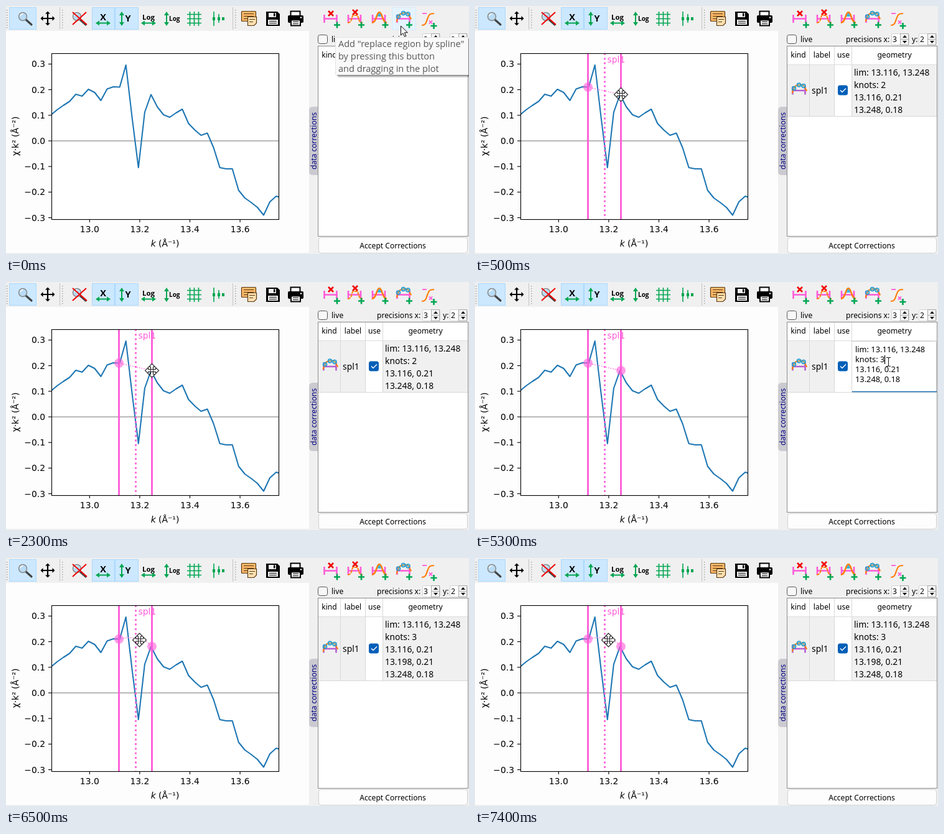
Recreate the animation shown at these times as an HTML page. Size 744 px wide and 399 px high, loop 8 s.

```html
<!DOCTYPE html>
<html lang="en">
<head>
<meta charset="utf-8">
<title>Spline correction</title>
<style>
html, body { margin: 0; width: 100%; height: 100%; overflow: hidden; background: #f0f0f0; }
svg { display: block; width: 100vw; height: 100vh; }
text { white-space: pre; }
.ui { font: 12.1px "Noto Sans", "Open Sans", sans-serif; }
.cell { font: 13.85px "Noto Sans", "Open Sans", sans-serif; }
.edit { font: 12.8px "Noto Sans", "Open Sans", sans-serif; }
.tip { font: 14.55px "Open Sans", "Noto Sans", sans-serif; fill: #575757; }
.axis { font: 13.89px "DejaVu Sans", sans-serif; }
.bold { font: bold 11.4px "Open Sans", sans-serif; }
.mid { text-anchor: middle; }
.end { text-anchor: end; }
</style>
</head>
<body>
<svg id="stage" viewBox="0 0 744 399" preserveAspectRatio="none"></svg>
<script>
const PINK = '#ff5ad8', GREEN = '#00a651', ORANGE = '#ff7f0e', BLUE = '#1f77b4', RED = '#f00000';

const rect = (x, y, w, h, fill, more = '') =>
  `<rect x="${x}" y="${y}" width="${w}" height="${h}" fill="${fill}" ${more}/>`;
const line = (d, color, w = 1, more = '') =>
  `<path d="${d}" fill="none" stroke="${color}" stroke-width="${w}" ${more}/>`;
const shape = (d, fill, more = '') => `<path d="${d}" fill="${fill}" ${more}/>`;
const dot = (x, y, r, fill, more = '') => `<circle cx="${x}" cy="${y}" r="${r}" fill="${fill}" ${more}/>`;
const text = (x, y, s, cls, more = '') => `<text x="${x}" y="${y}" class="${cls}" ${more}>${s}</text>`;
const at = (x, y, s) => `<g transform="translate(${x} ${y})">${s}</g>`;
const group = (id, s) => `<g id="${id}">${s}</g>`;
const cross = (x, y, r, color, w) =>
  line(`M${x - r} ${y - r}l${2 * r} ${2 * r}m0 ${-2 * r}l${-2 * r} ${2 * r}`, color, w);
const plus = (x, y) => line(`M${x - 5} ${y}h10m-5-5v10`, GREEN, 2.6);
const hArrow = (x, y, w) =>
  line(`M${x + 3} ${y}h${w - 6}`, GREEN, 2) +
  shape(`M${x} ${y}l6-4v8zM${x + w} ${y}l-6-4v8z`, GREEN);
const vArrow = (x, y, h) =>
  line(`M${x} ${y + 3}v${h - 6}`, GREEN, 2) +
  shape(`M${x} ${y}l-4 6h8zM${x} ${y + h}l-4-6h8z`, GREEN);

// Four-headed arrow, centred on 0,0
function fourWay(body, head, tip, fill, more) {
  const side = [`${-head} ${-(tip - head)}`, `0 ${-tip}`, `${head} ${-(tip - head)}`, `${body} ${-(tip - head)}`, `${body} ${-body}`];
  const turn = (p, n) => {
    let [x, y] = p.split(' ').map(Number);
    while (n--) [x, y] = [-y, x];
    return `${x} ${y}`;
  };
  const pts = [0, 1, 2, 3].flatMap(n =>
    [`${-body} ${-body}`, `${-body} ${-(tip - head)}`, ...side].map(p => turn(p, n)));
  return shape('M' + pts.join('L') + 'z', fill, more);
}
const moveCursor = fourWay(2, 5, 11, '#fff', 'stroke="#222" stroke-width="1.1"') +
  rect(-2, -2, 4, 4, '#fff', 'stroke="#222"');

function lens(x, y) {
  return line(`M${x + 5} ${y + 5}l9 8`, '#444', 3.2, 'stroke-linecap="round"') +
    dot(x, y, 6.5, '#b9dcf6', 'stroke="#8a8a8a" stroke-width="1.5"') +
    line(`M${x - 4} ${y - 1}q1-3.5 4.5-3.5`, '#fff', 1.5);
}

function handle(x) {
  let s = '';
  for (let y = 6; y < 36; y += 4) s += rect(x, y, 2, 2, '#b4b4b4') + rect(x + 1, y + 1, 1, 1, '#fff');
  return s;
}

function leftBar() {
  const on = (x, w) => rect(x + .5, 2.5, w - 1, 35, '#cce8ff', 'stroke="#a9d8ff"');
  let s = rect(0, 0, 487, 40, '#f0f0f0') + handle(1) + handle(90) + handle(368);
  s += line('M86.5 2V38M364.5 2V38', '#c4c4c4') + on(5, 44) + on(138, 37) + on(175, 38);
  s += lens(27, 17) + at(67, 20, fourWay(1.1, 4, 11.5, '#000'));
  s += lens(114, 17) + line('M107 10L130 30M129 10L107 30', RED, 2);
  s += text(156, 23, 'X', 'bold mid', 'style="font-size:14.5px"') + hArrow(144, 27.5, 24);
  s += vArrow(186, 9, 23) + text(196, 25, 'Y', 'bold mid', 'style="font-size:14.5px"');
  s += text(219, 22, 'Log', 'bold') + hArrow(217, 27.5, 24);
  s += vArrow(258, 9, 23) + text(262, 24, 'Log', 'bold', 'style="font-size:10px"');
  s += line('M291 13.5h23m-23 7h23m-23 7h23M295.500 9v23m7-23v23m7-23v23', GREEN, 1.6);
  s += line('M334 9v23M342 13v14', GREEN, 1.6) + rect(332, 18, 4, 5, GREEN) +
    rect(340, 18, 4, 5, GREEN) + rect(347, 18, 4, 5, GREEN);
  // notes
  s += rect(378.5, 8.5, 23, 16, '#fbb768', 'stroke="#5b3a12" stroke-width="1.2" rx="1"') +
    line('M382 12.500h16m-16 4h16m-16 4h8', '#5b3a12', 1.2) +
    shape('M388.500 17.500h14v10l-4 4h-10z', '#ffe0b0', 'stroke="#5b3a12" stroke-width="1.2"') +
    line('M391 21.500h9m-9 4h6', '#5b3a12', 1.1);
  // save
  s += shape('M418 9h18l4 4v19h-22z', '#000') + rect(422, 11, 12, 7, '#f0f0f0') +
    rect(430, 11.5, 2.5, 5, '#000') + rect(421, 22, 16, 8, '#f0f0f0') +
    line('M423 24.500h12m-12 3h12', '#000', 1);
  // print
  s += rect(457.5, 8.5, 15, 9, '#fff', 'stroke="#000" stroke-width="2"') +
    rect(453, 15, 25, 12, '#000', 'rx="2"') + dot(474, 18.5, 1.2, '#fff') +
    rect(458, 22.5, 15, 9, '#fff', 'stroke="#000" stroke-width="2"') +
    line('M461 25.500h9m-9 3h9', '#000', 1);
  return s;
}

const bar = (color = PINK) => line('M2 14v13M22 14v13M2 20.500h20', color, 2.6);
const arch = (base = PINK) => bar(base) +
  line('M1 25C3 20 4 13 9 12S17 10 20 13 22 19 25 21', ORANGE, 2.2) +
  [[4, 17], [12, 11.5], [19.5, 13]].map(([x, y]) => dot(x, y, 3, '#38b6e8', 'fill-opacity=".4" stroke="#1d9bd0" stroke-width="1.5"')).join('');

function rightBar() {
  let s = at(509.5, 0, bar() + cross(12.5, 12, 4, RED, 2.6) + plus(22.5, 30.5));
  s += at(548, 0, bar() + line('M1 27C9 27 7 15 10 15H16C19 15 17 27 25 27', ORANGE, 2, 'stroke-dasharray="5 1"') +
    cross(13, 10, 4, RED, 2.6) + plus(23, 30.5));
  s += at(587, 0, bar() + shape('M9 17Q10 10 13 10T17 17z', '#38b6e8') +
    line('M1 27C9 26 8 10 13 10S17 26 25 27', ORANGE, 2.6) + plus(22.5, 30.5));
  s += rect(620.5, 2.5, 38, 36, '#e5f3ff', 'id="hover" stroke="#d6ecff"');
  s += at(626.5, 0, arch() + plus(21.5, 30.5));
  s += at(667, 0, line('M1 31C8 31 8 26 10 21S12 12 21 12', ORANGE, 2.2) +
    line('M2 12h7', PINK, 1.8) + cross(15.5, 26, 2.6, PINK, 1.7) + plus(20.5, 32));
  return s;
}

function spin(x, n) {
  return rect(x + .5, 44.5, 28, 18, '#fff', 'stroke="#d2d2d2" rx="2"') + text(x + 2, 58, n, 'ui') +
    rect(x + 14.5, 44.5, 13, 9, '#f4f4f4', 'stroke="#aaa"') + rect(x + 14.5, 53.5, 13, 9, '#f4f4f4', 'stroke="#aaa"') +
    shape(`M${x + 18} 51h7l-3.500-4zM${x + 18} 56h7l-3.500 4z`, '#111');
}

function panel() {
  let s = rect(487, 0, 257, 399, '#f0f0f0') + rightBar();
  s += rect(501.5, 46.5, 15, 14, '#f8f8f8', 'stroke="#555" rx="3"') + text(523, 58, 'live', 'ui');
  s += text(596, 58, 'precisions x:', 'ui') + spin(669, 3) + text(702, 58, 'y:', 'ui') + spin(713, 2);
  s += shape('M501 162h-8q-6 0-6 6v98q0 6 6 6h8z', '#cbcad0');
  s += text(0, 0, 'data corrections', 'ui mid', 'fill="#000080" transform="translate(499 217) rotate(-90)"');
  s += rect(501.5, 64.5, 241, 306, '#fff', 'stroke="#8c8c8c"');
  s += text(519.5, 83, 'kind', 'ui mid');
  s += group('row', rect(502, 95, 240, 83, '#f0f0f0', 'id="rowBg"') +
    rect(578, 95, 27, 83, '#fff', 'id="useBg"') +
    line('M502 94.500H742', '#dcdcdc') + line('', '#d8d8d8', 1, 'id="grid"') +
    text(557.5, 83, 'label', 'ui mid') + text(592, 83, 'use', 'ui mid') + text(674, 83, 'geometry', 'ui mid') +
    group('rowItems', at(508.5, -20, arch('#b65fd0')) + text(541, 5.500, 'spl1', 'cell') +
      rect(583, -8, 16, 16, '#005fb8', 'rx="3.5"') + line('M587 0l3 3 6-6', '#fff', 1.4)) +
    group('geo', ''));
  s += rect(502.5, 372.5, 239, 25, '#fdfdfd', 'stroke="#d0d0d0" rx="4"') +
    text(621.5, 390, 'Accept Corrections', 'ui mid');
  return s;
}

const curveY = [175.5, 167, 160, 153.5, 142, 145, 134, 139, 152, 133.5, 130, 130.5, 95, 181, 260, 171, 142.5, 162,
  175, 179, 172, 166, 189, 199.5, 208, 204.5, 228, 260, 262, 262, 296.5, 309, 316, 324, 336.5, 315, 306, 309];

function plot() {
  let s = rect(0, 40, 487, 357, '#fdfdfd') + rect(73, 76, 365, 267, '#fff');
  const pts = curveY.map((y, i) => `${(72 + 10.06 * i).toFixed(1)} ${y}`).join('L');
  s += '<clipPath id="box"><rect x="73" y="76" width="365" height="267"/></clipPath>';
  s += `<g clip-path="url(#box)">${line('M73 217H438', '#a0a0a0', 1.4)}${line('M' + pts, BLUE, 2.1, 'stroke-linejoin="round"')}
    ${group('marks',
      line('M181.500 76V343M234.500 76V343', PINK, 2.8) +
      line('M208.500 76V343', PINK, 2.8, 'stroke-dasharray="2.8 4.600"') +
      line('', PINK, 1.4, 'id="spline" stroke-dasharray="1.4 2.300"') +
      dot(181.5, 130.5, 7.5, PINK, 'fill-opacity=".6"') +
      dot(234.5, 142.5, 7.5, PINK, 'id="knot" fill-opacity=".6"') +
      text(212.5, 91, 'spl1', 'axis', `fill="${PINK}"`))}</g>`;
  s += rect(73.5, 76.5, 365, 267, 'none', 'stroke="#000" stroke-width="1.1"');
  for (let n = -3; n <= 3; n++) {
    const y = 217 - n * 41.2;
    s += line(`M68 ${y}h5`, '#000', 1.1) +
      text(63, y + 5, (n < 0 ? '−' : '') + (Math.abs(n) / 10).toFixed(1), 'axis end');
  }
  for (let n = 0; n < 4; n++) {
    const x = 134.3 + n * 80.6;
    s += line(`M${x} 343v5`, '#000', 1.1) + text(x, 363.5, (13 + n / 5).toFixed(1), 'axis mid');
  }
  s += text(255.5, 387, '<tspan font-style="italic">k</tspan> (Å⁻¹)', 'axis mid');
  s += text(0, 0, 'χ·k² (Å⁻²)', 'axis mid', 'transform="translate(20 209.500) rotate(-90)"');
  return s;
}

function tooltip() {
  return rect(534, 53, 211, 62, '#000', 'fill-opacity=".16"') + rect(532, 52, 212, 61, '#000', 'fill-opacity=".3"') +
    rect(529.5, 50.5, 213, 60, '#f9f9f9', 'stroke="#e4e4e4"') +
    ['Add "replace region by spline"', 'by pressing this button', 'and dragging in the plot']
      .map((s, i) => text(534, 66 + i * 20, s, 'tip')).join('') +
    shape('M634.500 32v15l3.500-3.300 2.600 5.500 2.300-1-2.500-5.400h4.900z', '#fff', 'stroke="#000"');
}

const stage = document.getElementById('stage');
stage.innerHTML = rect(0, 0, 744, 399, '#f0f0f0') + leftBar() + plot() + panel() +
  group('tip', tooltip()) + group('mover', moveCursor) +
  group('caret', line('M658.500 118v14', '#000', 1.2) +
    line('M661 121.500h2.500l1 1 1-1h2.500M664.500 122v13M661 135.500h2.500l1-1 1 1h2.500', '#222', 1.1));

const el = id => document.getElementById(id);
const show = (id, on) => el(id).style.display = on ? '' : 'none';

const first = '13.116, 0.21', last = '13.248, 0.18', lim = 'lim: 13.116, 13.248';
const straight = 'M181.500 130.500L234.500 142.500';
const steps = [
  { start: 0 },
  { start: 500, bottom: 178, geo: [lim, 'knots: 2', first, last], path: straight, mouse: [234.5, 142.5] },
  { start: 3500, bottom: 178, geo: [lim, 'knots: 3', first, last], path: straight, edit: true },
  { start: 6500, bottom: 198, geo: [lim, 'knots: 3', first, '13.198, 0.21', last],
    path: 'M181.500 130.500Q199 126 214.500 130.500T234.500 142.500', mouse: [214.5, 132] }
];

function draw(s) {
  const active = !!s.geo;
  show('tip', !active);
  show('hover', !active);
  show('marks', active);
  show('row', active);
  show('mover', !!s.mouse);
  show('caret', !!s.edit);
  if (!active) return;
  el('spline').setAttribute('d', s.path);
  show('knot', !(s.mouse && s.mouse[0] > 230));
  if (s.mouse) el('mover').setAttribute('transform', `translate(${s.mouse})`);
  for (const id of ['rowBg', 'useBg']) el(id).setAttribute('height', s.bottom - 95);
  el('grid').setAttribute('d', `M537.500 65V${s.bottom}M577.500 65V${s.bottom}M605.500 65V${s.bottom}M502 ${s.bottom - .5}H742`);
  el('rowItems').setAttribute('transform', `translate(0 ${(s.bottom + 93) / 2})`);
  const [x, y, gap, cls] = s.edit ? [611, 113, 16, 'edit'] : [609, 112, 20, 'cell'];
  el('geo').innerHTML = (s.edit
    ? rect(605.5, 95.5, 136, 81, '#fff', 'stroke="#d4d4d4" rx="2"') + line('M606 176.500H742', '#1f6fb5', 1.6) : '') +
    s.geo.map((t, i) => text(x, y + i * gap, t, cls)).join('');
}

let shown;
function tick(now) {
  const t = now % 8000;
  const step = steps.findLast(s => t >= s.start);
  if (step !== shown) draw(shown = step);
  requestAnimationFrame(tick);
}
tick(0);
</script>
</body>
</html>
```
